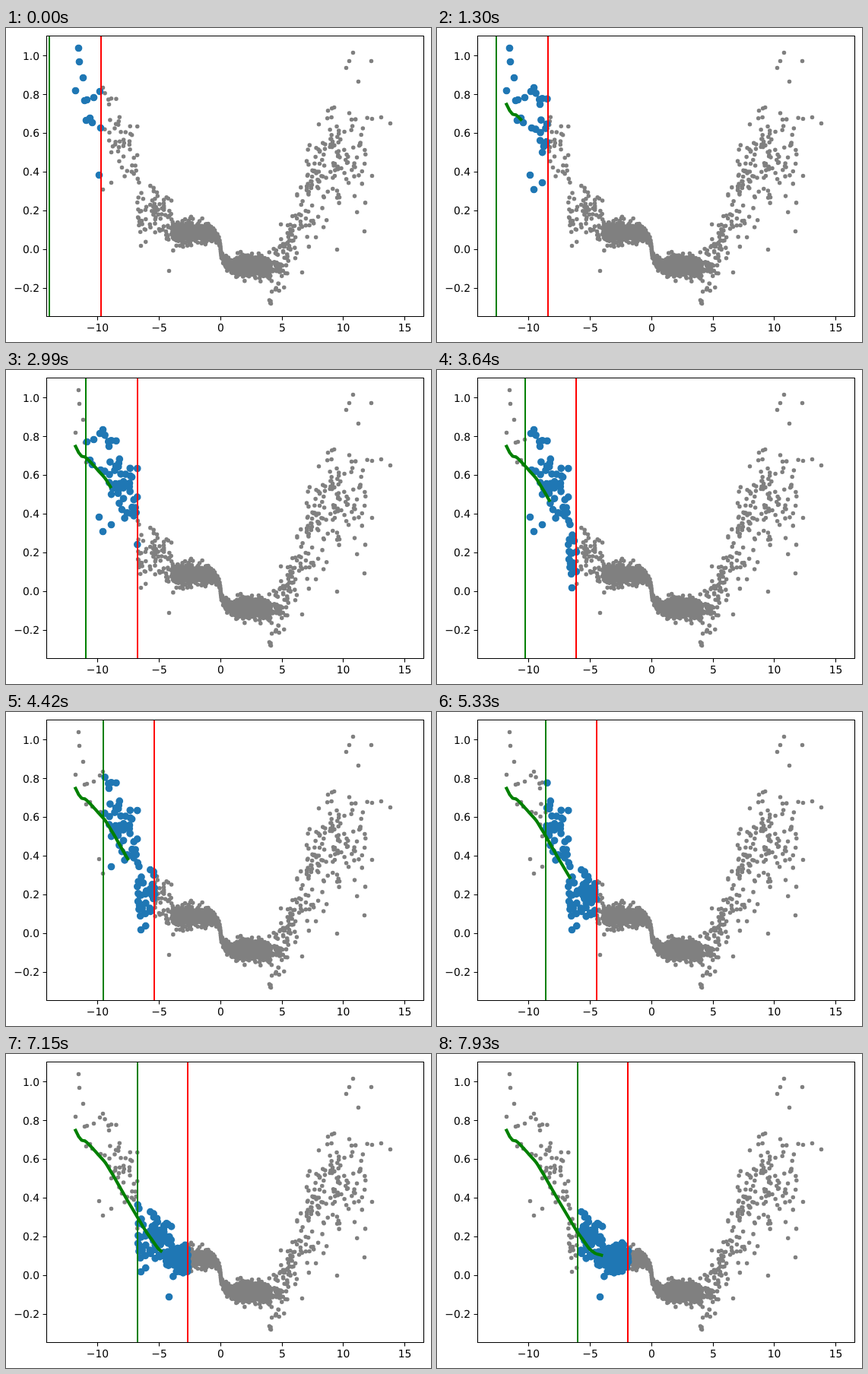
An HTML page with a canvas that plays this animation: 559x413 px, repeating every 8 s.

```html
<!DOCTYPE html>
<html>
<head>
<meta charset="utf-8">
<style>
  html, body { margin: 0; width: 100%; height: 100%; overflow: hidden; background: #fff; }
  canvas { display: block; }
</style>
</head>
<body>
<canvas id="plot" width="559" height="413"></canvas>
<script>
const ctx = document.getElementById('plot').getContext('2d');
const STEP = 130, LOOP = 8000;
const BOX = { l: 53, t: 10, r: 549, b: 379 };
const px = x => 281.8 + 16.15 * x;
const py = y => 290.7 - 254.3 * y;

let seed = 7;
function rand() {
  seed = (seed * 1664525 + 1013904223) % 4294967296;
  return seed / 4294967296;
}
function gauss(limit) {
  const r = Math.sqrt(-2 * Math.log(1 - rand()));
  return Math.max(-limit, Math.min(limit, r * Math.cos(2 * Math.PI * rand())));
}

// Outermost points of both branches
const points = [
  [91, 82], [95, 26], [96, 44], [101, 65], [103, 95], [106, 94], [105, 121],
  [110, 118], [113, 124], [115, 91], [123, 83], [124, 131], [122, 193],
  [127, 78], [127, 212], [138, 203], [135, 100], [177, 286], [214, 319],
  [456, 32], [451, 43], [480, 43], [447, 52], [463, 70], [481, 119], [493, 117],
  [505, 125], [481, 194], [471, 267], [435, 291], [389, 321], [348, 362]
];

// Gaussian cloud around a straight line
function cloud(count, [x0, y0], [x1, y1], spread) {
  for (let i = 0; i < count; i++) {
    const k = rand();
    points.push([x0 + (x1 - x0) * k, y0 + (y1 - y0) * k + spread * gauss(2)]);
  }
}
cloud(46, [127, 120], [173, 180], 25);
cloud(38, [173, 239], [197, 248], 19);
cloud(50, [195, 241], [220, 262], 20);
cloud(60, [344, 322], [371, 290], 22);
cloud(45, [369, 282], [398, 230], 20);
cloud(90, [395, 215], [440, 155], 38);
cloud(48, [435, 155], [475, 170], 45);

// Dense central band, pinched at zero
for (let i = 0; i < 1300; i++) {
  const side = i % 2 ? 1 : -1, d = 4 * Math.pow(rand(), 1.3);
  const y = -0.088 * side * Math.tanh(1.8 * Math.pow(d, 0.6));
  const spread = 0.005 + 0.022 * Math.min(1, d / 1.3);
  points.push([px(side * d), py(y + spread * gauss(3))]);
}

// Running mean through a few key points
const keys = [[91, 100], [95, 108], [99, 113], [104, 114], [112, 122], [130, 142],
  [141, 160], [158, 190], [183, 232], [200, 256], [208, 262], [219, 265]];
function meanAt(x) {
  const i = Math.max(1, keys.findIndex(k => k[0] >= x));
  const [x0, y0] = keys[i - 1], [x1, y1] = keys[i];
  return y0 + (y1 - y0) * (x - x0) / (x1 - x0);
}

function dots(list, radius, color) {
  ctx.fillStyle = color;
  ctx.beginPath();
  for (const [x, y] of list) {
    ctx.moveTo(x + 0.5 + radius, y + 0.5);
    ctx.arc(x + 0.5, y + 0.5, radius, 0, 2 * Math.PI);
  }
  ctx.fill();
}

function curve(n) {
  ctx.strokeStyle = '#008000';
  ctx.lineWidth = 4.17;
  ctx.lineCap = 'square';
  ctx.lineJoin = 'round';
  ctx.beginPath();
  for (let i = 0; i < n; i++) {
    const x = 91 + 2.08 * i;
    ctx.lineTo(x + 0.5, meanAt(x) + 0.5);
  }
  ctx.stroke();
}

function bar(x, color) {
  ctx.fillStyle = color;
  ctx.fillRect(Math.round(x) - 1, BOX.t, 2, BOX.b - BOX.t);
}

function axes() {
  const label = (text, x, y) => ctx.fillText(text.replace('-', '\u2212'), x, y);
  ctx.strokeStyle = ctx.fillStyle = '#000';
  ctx.lineWidth = 1.1;
  ctx.lineCap = 'butt';
  ctx.font = '13.89px "DejaVu Sans", sans-serif';
  ctx.textRendering = 'geometricPrecision';
  ctx.strokeRect(BOX.l + 0.5, BOX.t + 0.5, BOX.r - BOX.l, BOX.b - BOX.t);
  ctx.beginPath();
  ctx.textAlign = 'center';
  for (let v = -10; v <= 15; v += 5) {
    const x = Math.round(px(v)) + 0.5;
    ctx.moveTo(x, BOX.b + 0.5);
    ctx.lineTo(x, BOX.b + 5.4);
    label(String(v), x, 399);
  }
  ctx.textAlign = 'right';
  for (let v = -2; v <= 10; v += 2) {
    const y = Math.round(py(v / 10)) + 0.5;
    ctx.moveTo(BOX.l + 0.5, y);
    ctx.lineTo(BOX.l - 4.4, y);
    label((v / 10).toFixed(1), 44, Math.round(py(v / 10) + 5.3));
  }
  ctx.stroke();
}

function draw(n) {
  const left = 57 + 2.1 * n, right = 125 + 2.07 * n;
  ctx.fillStyle = '#fff';
  ctx.fillRect(0, 0, 559, 413);
  dots(points, 2.78, '#808080');
  dots(points.filter(([x]) => x >= left && x <= right), 4.86, '#1f77b4');
  curve(n);
  bar(left, '#008000');
  bar(right, '#ff0000');
  axes();
}

const start = performance.now();
let shown = -1;
function tick() {
  const n = Math.floor(((performance.now() - start) % LOOP) / STEP);
  if (n !== shown) draw(shown = n);
  requestAnimationFrame(tick);
}
tick();
</script>
</body>
</html>
```
